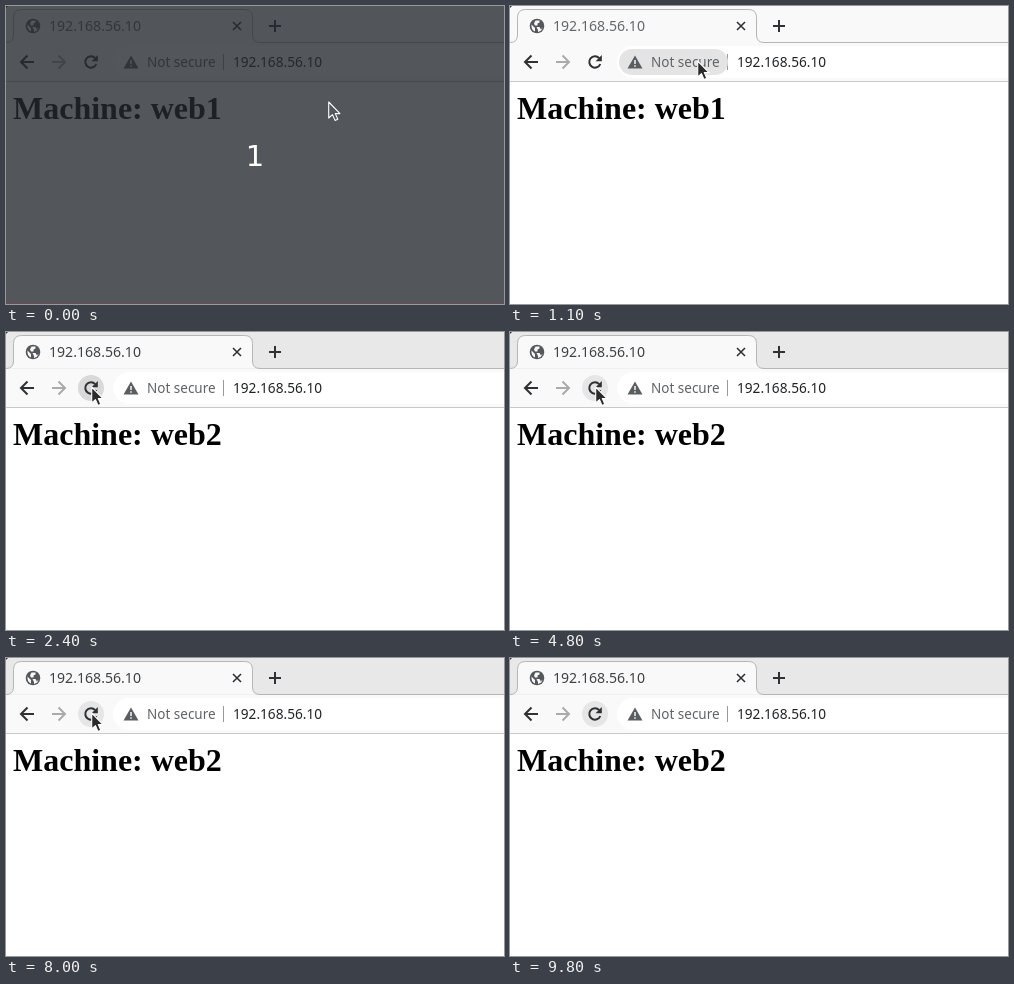
These frames come from a looping animation (498x298 px, 10 s). An HTML page:

```html
<!DOCTYPE html>
<html lang="en">
<head>
<meta charset="utf-8">
<title>Reloading a balanced page</title>
<style>
html, body { margin: 0; width: 100%; height: 100%; overflow: hidden; background: #fff; }
svg { display: block; width: 498px; height: 298px; }
text { font-family: "Noto Sans", "Open Sans", sans-serif; }
.heading { font: bold 32px "Liberation Serif", "Times New Roman", serif; }
.count { font: 29px "DejaVu Sans", sans-serif; }
.line { fill: none; stroke: #2f3133; stroke-width: 2; }
.anim { animation: 10s step-end infinite; }

.strip { animation-name: strip; }
.title { animation-name: title; }
.web1 { animation-name: web1; }
.web2 { animation-name: web2; }
.pill { animation-name: pill; }
.halo { animation-name: halo; }
.overlay { animation-name: overlay; }
.arrow { animation-name: arrow; }
.cursor { animation-name: move; }

/* The window gains focus with the first click */
@keyframes strip { 0% { fill: #f9f9f9 } 22%, 100% { fill: #e8e8e8 } }
@keyframes title { 0% { fill: #64676a } 22%, 100% { fill: #3f4245 } }

/* Each reload swaps the answering machine */
@keyframes web1 {
  0%, 50%, 82% { visibility: visible }
  23%, 66%, 95%, 100% { visibility: hidden }
}
@keyframes web2 {
  0%, 50%, 82% { visibility: hidden }
  23%, 66%, 95%, 100% { visibility: visible }
}

@keyframes pill { 0%, 15%, 100% { visibility: hidden } 10% { visibility: visible } }
@keyframes halo {
  0%, 83% { fill: transparent }
  18%, 48%, 93%, 100% { fill: #e6e6e6 }
  22% { fill: #d9d9d9 }
}
@keyframes overlay { 0% { visibility: visible } 1%, 100% { visibility: hidden } }
@keyframes arrow {
  0% { fill: #54575d; stroke: #fff }
  1%, 100% { fill: #2b2b2b; stroke: #fff }
}
@keyframes move {
  0% { transform: translate(322px, 95px) }
  3% { transform: translate(322px, 95px); animation-timing-function: steps(8) }
  11% { transform: translate(187px, 54px); animation-timing-function: steps(3) }
  14% { transform: translate(124px, 50px); animation-timing-function: steps(4) }
  18% { transform: translate(85px, 54px) }
  81% { transform: translate(85px, 54px); animation-timing-function: steps(3) }
  84% { transform: translate(106px, 131px) }
  85% { transform: translate(106px, 131px); animation-timing-function: steps(2) }
  87% { transform: translate(124px, 120px); animation-timing-function: steps(4) }
  91% { transform: translate(87px, 61px) }
  93% { transform: translate(85px, 54px); visibility: visible }
  98%, 100% { transform: translate(85px, 54px); visibility: hidden }
}
</style>
</head>
<body>
<svg viewBox="0 0 498 298">
  <rect width="498" height="298" fill="#fff"/>

  <!-- Tab strip -->
  <rect class="anim strip" width="498" height="37"/>
  <path d="M0 0H2L0 2Z" fill="#333"/>
  <rect y="37" width="498" height="38" fill="#f9f9f9"/>
  <path d="M0 36.5Q7.5 36.5 7.5 29V11.5Q7.5 3.5 15.5 3.5H238.5Q246.5 3.5 246.5 11.5V29Q246.5 36.5 254 36.5" fill="#f9f9f9"/>
  <path d="M0 36.5Q7.5 36.5 7.5 29V11.5Q7.5 3.5 15.5 3.5H238.5Q246.5 3.5 246.5 11.5V29Q246.5 36.5 254 36.5H498" fill="none" stroke="#b5b5b5"/>
  <circle cx="27" cy="20" r="7.3" fill="#55585b"/>
  <path d="M21.5 18.5L25 22V25.6Q21 24 21.5 18.5ZM25.5 14.5H29.5V16.5L27.5 17.5V19.5H25L24 17.5ZM26.5 21H29.5L31 23.5L32.5 21.5Q32 25 28 26V24Z" fill="#f9f9f9"/>
  <text class="anim title" x="43" y="25" font-size="14.1">192.168.56.10</text>
  <path class="line" d="M227 16L235 24M235 16L227 24" stroke-width="1.6" style="stroke-width:1.6"/>
  <path class="line" d="M263 20H275M269 14V26"/>

  <!-- Toolbar -->
  <path d="M498 40H123A16 16 0 0 0 123 72H498Z" fill="#fff"/>
  <path d="M0 75.5H498" stroke="#c9c9c9"/>
  <path class="line" d="M28 56H15M21.5 49.5L15 56L21.5 62.5"/>
  <path class="line" d="M46 56H59M52.5 49.5L59 56L52.5 62.5" style="stroke:#aaa"/>
  <circle class="anim halo" cx="85" cy="56" r="13"/>
  <path class="line" d="M90.3 58A5.7 5.7 0 1 1 89.2 52.1"/>
  <path d="M91.8 49V55.2H85.6Z" fill="#2f3133"/>
  <path d="M217.5 48V64" stroke="#999"/>
  <rect class="anim pill" x="109" y="43" width="109" height="26" rx="13" fill="#e4e4e4"/>
  <path d="M125 49.5L132.5 62.5H117.5Z" fill="#5b5e61"/>
  <path d="M125 54V58M125 59.3V60.8" stroke="#fff" stroke-width="1.4"/>
  <text x="141" y="61" font-size="13.5" fill="#606366">Not secure</text>
  <text x="227" y="61" font-size="13.65" fill="#202224">192.168.56.10</text>

  <!-- Page -->
  <text class="heading anim web1" x="7" y="113">Machine: web1</text>
  <text class="heading anim web2" x="7" y="113">Machine: web2</text>

  <!-- Countdown -->
  <g class="anim overlay">
    <rect width="498" height="298" fill="rgb(38,42,49)" fill-opacity=".79"/>
    <rect y="296" width="498" height="2" fill="#5d5258"/>
    <text class="count" x="249" y="160" text-anchor="middle" fill="#fff">1</text>
  </g>

  <g class="anim cursor">
    <path class="anim arrow" d="M.7 1V17L4.5 13.6L7 19.4L9.8 18.2L7.3 12.6H12Z" stroke-width="1.1" stroke-linejoin="round"/>
  </g>
</svg>
</body>
</html>
```
